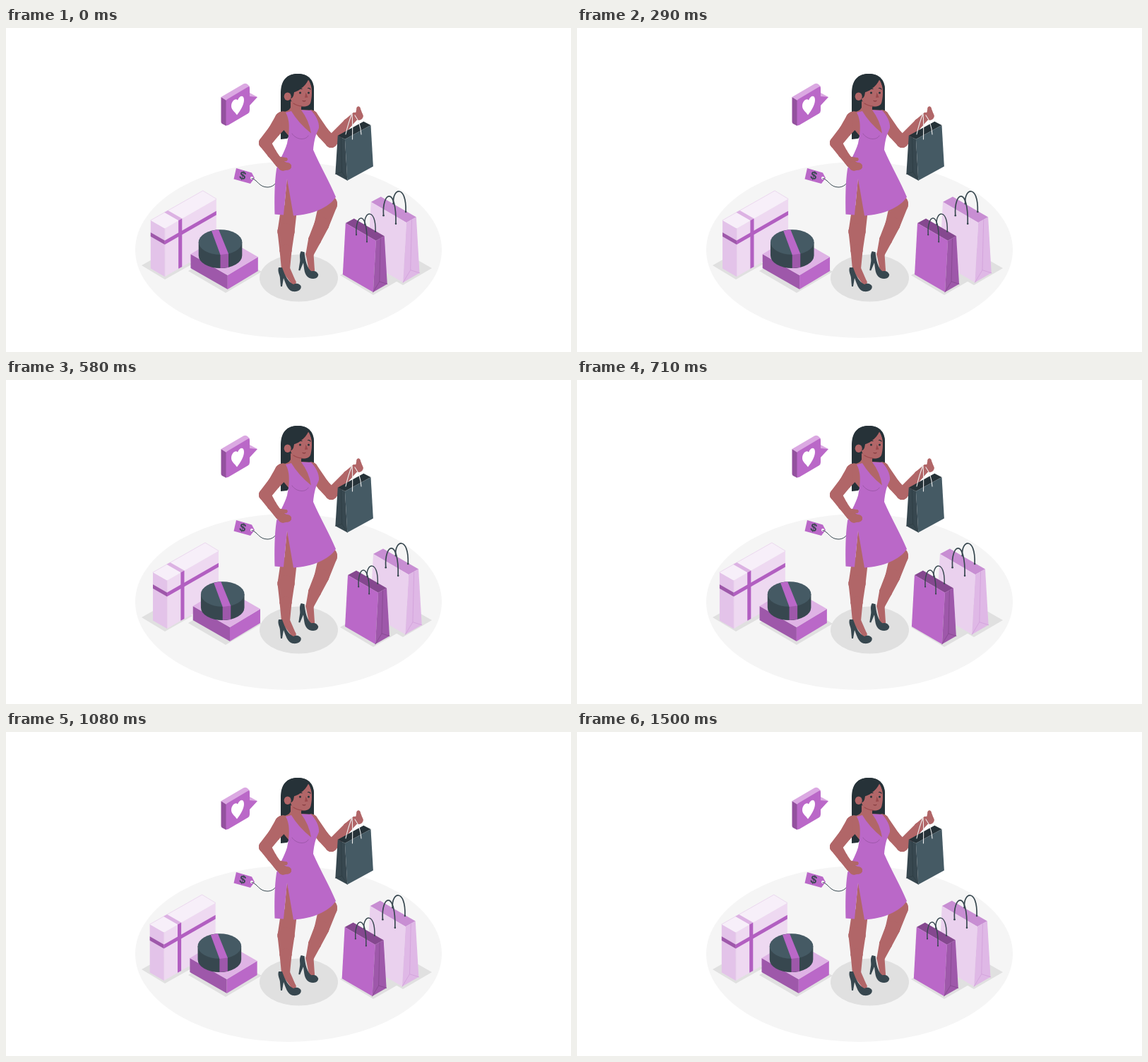
Animation of 800x460 px, one loop 1.54 s. Source, as an HTML page with a canvas:

```html
<!DOCTYPE html>
<html lang="en">
<head>
<meta charset="utf-8">
<title>Shopping</title>
<style>
  html, body { margin: 0; width: 100%; height: 100%; overflow: hidden; background: #fff; }
  canvas { display: block; width: 800px; height: 460px; }
</style>
</head>
<body>
<canvas id="stage" width="800" height="460"></canvas>
<script>
const ctx = document.getElementById('stage').getContext('2d');

const PURPLE = '#ba68c8', PLUM = '#9e58aa', SKIN = '#b16668', BLUSH = '#9a4a4d';
const INK = '#263238', SLATE = '#37474f', STEEL = '#455a64', SHADOW = '#e0e0e0';

function fill(color, d) {
  ctx.fillStyle = color;
  ctx.fill(new Path2D(d));
}

function line(color, width, d) {
  ctx.strokeStyle = color;
  ctx.lineWidth = width;
  ctx.lineCap = ctx.lineJoin = 'round';
  ctx.stroke(new Path2D(d));
}

function oval(color, x, y, rx, ry = rx) {
  ctx.fillStyle = color;
  ctx.beginPath();
  ctx.ellipse(x, y, rx, ry, 0, 0, Math.PI * 2);
  ctx.fill();
}

// Runs a drawing in its own coordinate system.
function place(x, y, paint, { sx = 1, sy = sx, turn = 0 } = {}) {
  ctx.save();
  ctx.translate(x, y);
  ctx.rotate(turn);
  ctx.scale(sx, sy);
  paint();
  ctx.restore();
}

// Part of the parallelogram spanned by u and v, between fractions a and b.
function face(color, u, v, a = [0, 0], b = [1, 1]) {
  const at = (s, t) => `${u[0] * s + v[0] * t} ${u[1] * s + v[1] * t} `;
  fill(color, 'M' + at(a[0], a[1]) + at(b[0], a[1]) + at(b[0], b[1]) + at(a[0], b[1]) + 'Z');
}

function box(left, right, height, [leftColor, rightColor, topColor]) {
  face(leftColor, left, [0, height]);
  face(rightColor, right, [0, height]);
  face(topColor, left, right);
}

// Tapered, rounded segments through joints of the form [x, y, radius].
function limb(color, ...joints) {
  joints.forEach(([x, y, r], i) => {
    oval(color, x, y, r);
    if (!i) return;
    const [px, py, pr] = joints[i - 1];
    const angle = Math.atan2(y - py, x - px);
    const spread = Math.acos((pr - r) / Math.hypot(x - px, y - py));
    ctx.beginPath();
    ctx.arc(px, py, pr, angle + spread, angle - spread);
    ctx.arc(x, y, r, angle - spread, angle + spread);
    ctx.fill();
  });
}

function drawFloor() {
  ctx.fillStyle = '#fff';
  ctx.fillRect(0, 0, 800, 460);
  oval('#f5f5f5', 400, 315, 217, 125);
  oval(SHADOW, 414.5, 355, 55.5, 33.5);
  const shadow = (x, y, left, right) => place(x, y, () => face(SHADOW, left, right));
  shadow(225, 357, [-33, -20], [39, -22]);
  shadow(311, 376, [-53, -31], [51, -30]);
  shadow(520, 379, [-47, -28], [40, -23]);
  shadow(562, 365, [-40, -23], [41, -24]);
}

function drawTallGift() {
  const left = [-20, -11.5], right = [73, -42], down = [0, 68.5];
  const ribbon = '#b25fc1', from = 0.265, to = 0.335;
  box(left, right, down[1], ['#e3c3e9', '#eed9f1', '#f7eff9']);
  line('#e3c6e8', 0.6, 'M-20-11.5 54-53.5 73-42M0 0V68');
  face('#dcb2e3', left, right, [0, from], [1, to]);
  face(PLUM, left, down, [0, 0.25], [1, 0.335]);
  face(ribbon, right, down, [0, 0.25], [1, 0.335]);
  face(ribbon, right, down, [from, 0], [to, 1]);
}

function drawHatBox() {
  box([-52.3, -30], [43, -26], 20, [PLUM, PURPLE, '#dfb3e5']);
  place(-10.3, -47, () => {
    fill(SLATE, 'M-30.8 0H30.8V19A30.8 18 0 0 1-30.8 19Z');
    oval(STEEL, 0, 0, 30.8, 17.8);
    fill(PLUM, 'M0 17 11.5 16V36L0 37Z');
    fill(PURPLE, 'M-12.5-16-2.5-18 11.5 16.5 0 18Z');
  });
}

function bag({ front, side, fold, inside }) {
  fill(inside, 'M0 0 12-6.5 55 18.5 43 25Z');
  fill(front, 'M0 0 43 25 39 98-4 73Z');
  fill(side, 'M43 25 55 18.5 59 86.5 39 98Z');
  line(fold, 0.8, 'M49.5 22 48 83 59 86.5M48 83 39 98');
}

function handle(x, y, lift) {
  line(SLATE, 1.45, `M${x} ${y}C${x - 2} ${y - lift} ${x + 16} ${y - lift - 6} ${x + 15} ${y + 10}`);
  oval(SLATE, x, y, 1.1);
  oval(SLATE, x + 15, y + 10, 1.1);
}

function drawHandledBag(colors) {
  bag(colors);
  handle(27.3, 2, 18.5);
  handle(15.2, 16.5, 30);
}

function drawBubble() {
  fill('#93519e', 'M304.5 98 312 102V139L306 136Q304.5 135 304.5 133Z');
  fill('#dba9e2', 'M304.5 98 336 79.5Q339 78 342 80L345 83V92L356 98H345L312 103Z');
  fill(PURPLE, 'M311.5 104Q311.5 102 313.5 101L342 84Q345 82 345 86V97L356 98 345 110V117Q345 120 342.5 121.5L314.5 138Q311.5 139.5 311.5 136Z');
  fill('#fff', 'M328 102.5C325 99 319 104 319 111C319 116 324 119 327 123.5C332 117 337 109 337 102C337 95 331 95 328 102.5Z');
}

function drawTag() {
  fill(PURPLE, 'M326 199 348 205.5 352 213 346 221 322.5 214.5Z');
  oval('#fff', 348, 213, 2);
  line(SLATE, 1, 'M348 213.5C356 215 358 226 370 226C376 226 380 223 382 220');
  place(335, 210.5, () => {
    ctx.fillStyle = SLATE;
    ctx.font = 'bold 16px Arial, sans-serif';
    ctx.textAlign = 'center';
    ctx.textBaseline = 'middle';
    ctx.fillText('$', 0, 0);
  }, { turn: 0.27 });
}

function shoe() {
  fill(SLATE, 'M0 1C-2 7 2 12 2 16L3 28H5L7 16C10 23 12 33 20 35C28 36 33 32 31.5 27C28 23 25 23 21 25C14 22 9 13 5 1Z');
}

function drawLegs() {
  limb(SKIN, [456, 250, 13], [447, 279, 10.5], [437, 301, 9], [430, 321, 5.5], [433, 344, 4]);
  place(418, 316, shoe, { turn: 0.24 });
  limb(SKIN, [400, 262, 11.5], [396.5, 289, 12], [396, 316, 8.5], [396, 342, 6], [407, 361, 3.5]);
  fill(SKIN, 'M398 212 393 266H409Z');
  place(386, 339, shoe);
}

function drawTorso() {
  limb(SKIN, [432, 126, 9.5], [449, 149, 8.5], [460.5, 161.5, 8.5], [484, 135, 6.5], [494, 125.5, 5.5], [500, 125, 5.5], [499, 114, 2.5]);
  limb(SKIN, [392, 130, 11.5], [380, 146, 9], [366.5, 163, 8.5], [376.5, 178, 6.8], [387, 192, 6]);
  fill(SKIN, 'M403 104V113Q400 119 391 119L390 141 401 154H436L433 117 418 116V108Z');
}

function drawHead() {
  fill(SKIN, 'M403 92C412 92 424 83 428 73C434 80 434 95 431.5 105C430 112 422 112 416 111C408 110 404 106 403 100Z');
  fill(INK, 'M404 100C410 96 405 90 412 87.5C420 85 425 80 428 73.5C432 78 432 86 436 90C437 75 429 65 413 65C397 65 391 75 390 88L395 95Z');
  oval(SKIN, 398.7, 97.2, 5, 5.8);
  line(BLUSH, 1.2, 'M407 107Q412 110.5 419 111');
  for (const x of [416.5, 428.5]) oval(INK, x, 92, 1.5);
  line(INK, 1.2, 'M413.5 88Q416 85.5 419 86.5M427.5 85.5Q430 85 431 87');
  fill(BLUSH, 'M424.5 91.5 427.5 98.5 423 99Z');
  line('#7c3236', 1, 'M420 103.5Q422 105 424 103.5');
}

function drawDress() {
  fill(PURPLE, 'M396 120 404 118Q414 135 432 149.5Q429 131 418 116.5L432 117C438 123 444 133 443 142C441 148 437 152 435 173C444 194 458 218 467 240C457 255 434 265 407 266.5L398 214 393 265.5 380.5 264.5C380 244 380 220 383 200C387 187 394 177 398 164C400 155 404 134 396 120Z');
  line(PLUM, 1, 'M405 150C411 159 424 160 428 153');
  limb(SKIN, [384, 188, 6], [392, 196, 6.5], [399, 196.5, 5]);
  limb(SKIN, [386, 186, 3.5], [396, 186.5, 2.5]);
}

function drawWoman() {
  fill(INK, 'M389 158V92C389 74 398 65 413 65C429 65 436 75 436 90V120L398 157Z');
  drawLegs();
  drawTorso();
  drawHead();
  drawDress();
  place(516.5, 138, () => bag({ front: STEEL, side: SLATE, fold: '#2c3a41', inside: INK }), { sx: -0.85, sy: 0.8 });
  line('#eee', 1.1, 'M481 151C483 142 486 131 490 121.5Q491 133 490.5 158M494 124Q502 135 503 151');
}

// Alternating sideways jolts that double up to 4 and die away again.
const CYCLE = 1500, LOOP = 1540, FPS = 24, LEAD = 30, SCALE = 0.92;

function jolt(i) {
  const edge = Math.min(i, 10 - i);
  return edge ? (-1) ** i * Math.min(4, 2 ** (edge - 1)) : 0;
}

function shakeAt(ms) {
  const step = Math.floor((ms % LOOP + 5) * FPS / 1000);
  const pos = (step * 1000 / FPS + LEAD) % CYCLE / CYCLE * 10;
  const i = Math.floor(pos);
  return SCALE * (jolt(i) + (jolt(i + 1) - jolt(i)) * (pos - i));
}

function drawParcels() {
  place(225, 284.5, drawTallGift);
  place(314, 351, drawHatBox);
  place(517, 247, () => drawHandledBag({ front: '#ead1ee', side: '#dfb8e6', fold: '#d3a3dc', inside: '#c88ed3' }), { sx: 1.165 });
  place(481, 277, () => drawHandledBag({ front: PURPLE, side: PLUM, fold: '#85488f', inside: '#85488f' }));
}

function draw(ms) {
  drawFloor();
  place(shakeAt(ms), 0, drawParcels);
  drawBubble();
  drawTag();
  drawWoman();
}

let start;
function tick(now) {
  start ??= now;
  draw(now - start);
  requestAnimationFrame(tick);
}
draw(0);
requestAnimationFrame(tick);
</script>
</body>
</html>
```
